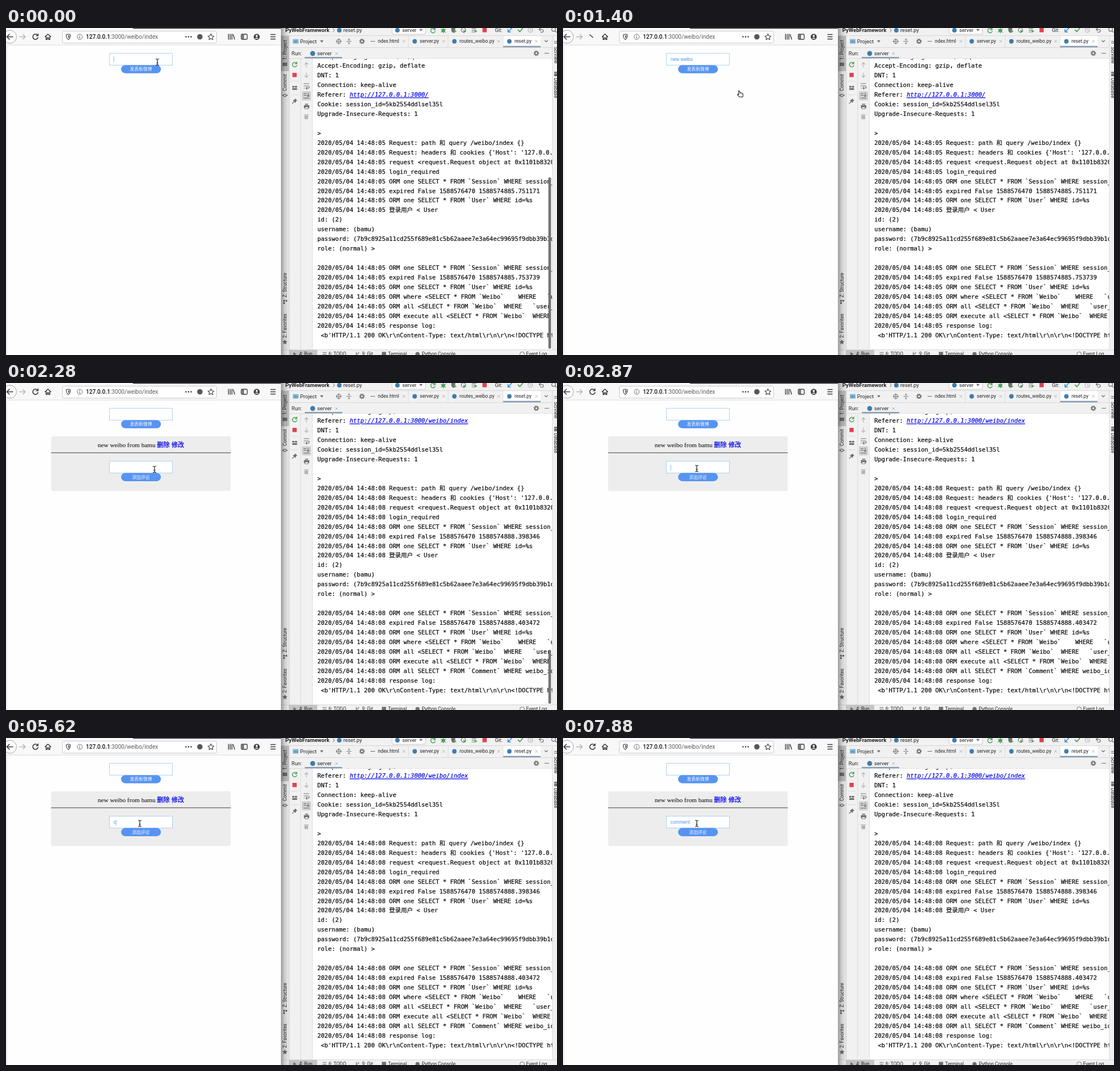
These frames come from a looping animation (972x576 px, 8000 ms). An HTML page:

```html
<!DOCTYPE html>
<html lang="en">
<head>
<meta charset="utf-8">
<title>Posting and commenting</title>
<style>
html, body { margin: 0; width: 100%; height: 100%; overflow: hidden; background: #fefefe; }
svg { display: block; width: 100vw; height: 100vh; }
text { white-space: pre; }
.ui { font-family: Roboto, 'Noto Sans CJK SC', 'Noto Sans CJK', sans-serif; }
.form { font-family: 'Liberation Sans', 'Noto Sans CJK SC', 'Noto Sans CJK', sans-serif; }
.serif { font-family: 'Liberation Serif', 'Noto Sans CJK SC', 'Noto Sans CJK', serif; }
.mono { font-family: 'DejaVu Sans Mono', 'Noto Sans CJK SC', 'Noto Sans CJK', monospace; stroke: #080808; stroke-width: .2; }
.url { fill: #0000e6; stroke: #0000e6; font-style: italic; text-decoration: underline; }
</style>
</head>
<body>
<svg id="stage" viewBox="0 0 972 576" xmlns="http://www.w3.org/2000/svg"></svg>
<script>
const LOOP = 8000;
const DARK = '#3c3c3f', GREY = '#6e6e6e', PALE = '#b4b4b6', GREEN = '#4fa35b', RED = '#e0424f';
const BLUE = '#5794f1', LINK = '#0000ee', PY = '#3f7cad', BAR = '#f1f1f1', EDGE = '#d2d2d2';

const esc = s => s.replace(/&/g, '&amp;').replace(/</g, '&lt;');
const rect = (x, y, w, h, fill, more = '') =>
  `<rect x="${x}" y="${y}" width="${w}" height="${h}" fill="${fill}" ${more}/>`;
const line = (d, color = DARK, w = 1.3, fill = 'none') =>
  `<path d="${d}" fill="${fill}" stroke="${color}" stroke-width="${w}" stroke-linecap="round" stroke-linejoin="round"/>`;
const shape = (d, fill) => `<path d="${d}" fill="${fill}"/>`;
const disc = (x, y, r, fill, more = '') => `<circle cx="${x}" cy="${y}" r="${r}" fill="${fill}" ${more}/>`;
const ring = (x, y, r, color = DARK, w = 1.2) => disc(x, y, r, 'none', `stroke="${color}" stroke-width="${w}"`);
const text = (x, y, s, size, fill = '#262626', cls = 'ui', more = '') =>
  `<text class="${cls}" x="${x}" y="${y}" font-size="${size}" fill="${fill}" ${more}>${esc(s)}</text>`;
const side = (x, y, s, turn) =>
  `<g transform="translate(${x} ${y}) rotate(${turn})">${text(0, 0, s, 8.4)}</g>`;
const group = (id, body = '', more = '') => `<g id="${id}" ${more}>${body}</g>`;
const cross = (x, y) => line(`M${x - 2} ${y - 2}l4 4m0-4l-4 4`, '#a3a3a3', .8);
const down = (x, y) => shape(`M${x - 3} ${y - 1.8}h6l-3 4z`, GREY);
const gear = (x, y) => ring(x, y, 2.6, GREY, 1.8) +
  disc(x, y, 4, 'none', `stroke="${GREY}" stroke-width="1.6" stroke-dasharray="1.6 1.54"`);

function browser() {
  let s = rect(0, 0, 485, 576, '#fefefe') + rect(0, 0, 485, 30, '#f8f8f9') + rect(0, 29.5, 485, 1, '#dcdcde') +
    rect(0, 30, 2.5, 546, '#f0f0f0') + rect(224, 0, 261, 1.2, '#2b2b2e');
  s += disc(7, 15.5, 11.5, '#fcfcfc', 'stroke="#a5a5a8"') + line('M12 15.5H1.5M6 11l-4.5 4.5L6 20', DARK, 1.6);
  s += line('M24 15.5h10M30 11.5l4 4-4 4', PALE, 1.4);
  s += line('M69 15.5l5-4.8 5 4.8M70.7 15v5.3h2.1v-3h2.4v3h2.1V15', DARK, 1.5);
  s += rect(99.5, 5.5, 272, 21, '#fff', 'rx="2.5" stroke="#cacacd"');
  s += line('M106.2 12l3.8-1.3 3.8 1.3c0 4-1 6.6-3.8 8.6-2.8-2-3.8-4.6-3.8-8.6z', DARK, 1.1) +
    shape('M110 12.5v6c1.5-1.5 2-3 2-5.3z', DARK);
  s += ring(130, 15.5, 4.5, GREY, 1) + rect(129.4, 14.8, 1.2, 3.4, GREY) + rect(129.4, 12.7, 1.2, 1.2, GREY);
  s += `<text class="ui" x="141" y="19.3" font-size="10.1" fill="#5c5c5f"><tspan fill="#111" font-weight="500">127.0.0.1</tspan>:3000/weibo/index</text>`;
  s += [317.5, 322, 326.5].map(x => disc(x, 15.5, 1.3, DARK)).join('');
  s += disc(342, 15.5, 4.8, '#58585b');
  s += line('M361.5 10.3l1.6 3.5 3.8.4-2.8 2.6.8 3.7-3.4-1.9-3.4 1.9.8-3.7-2.8-2.6 3.8-.4z', DARK, 1.1);
  s += line('M392.5 11v9M395.5 11v9M398.5 11v9M400.7 11.5l2.6 8.2', DARK, 1.4);
  s += rect(415, 11, 10.5, 9, 'none', `rx="1.5" stroke="${DARK}" stroke-width="1.3"`) + rect(416, 12, 4, 7, '#77777a');
  s += disc(442.3, 15.5, 5.3, DARK) + disc(442.3, 14, 1.9, '#f8f8f9') + shape('M438.8 18.8a3.6 2.5 0 0 1 7 0z', '#f8f8f9');
  return s + line('M467 11.5h8M467 15.5h8M467 19.5h8', DARK, 1.4);
}

const field = (y, label) =>
  rect(182.6, y, 111, 20.8, '#fff', 'stroke="#a7cbf5" stroke-width=".9"') +
  rect(203, y + 20.8, 70.3, 14.3, BLUE, 'rx="7.1"') +
  text(238, y + 30.8, label, 7.8, '#f4f8ff', 'form', 'text-anchor="middle"');

const link = (x, s, more = '') =>
  text(x, 113, s, 11.2, LINK, 'serif', `stroke="${LINK}" stroke-width=".25" ${more}`);

const card = () =>
  rect(79.5, 93.8, 317, 96.5, '#ededed', 'rx="4"') + rect(79.5, 122, 317, 1.7, '#858585') +
  text(161.8, 113, 'new weibo from bamu', 11.3, '#000', 'serif') +
  link(266.3, '删除') + link(291.9, '修改', 'id="edit"') + field(137.8, '添加评论');

function toolbars() {
  let s = rect(485, 0, 487, 576, BAR);
  s += rect(485, 13, 487, .8, EDGE) + rect(499, 34, 464, .8, EDGE) + rect(499, 53.5, 464, .8, EDGE);
  s += rect(485, 14, 14, 62, '#c4c4c4');
  s += rect(540, 54, 424, 512.5, '#fff');
  s += rect(499, 13, .7, 553, EDGE) + rect(519.5, 54, .7, 512, EDGE) + rect(540, 54, .7, 512, EDGE) + rect(963.5, 13, .8, 553, EDGE);

  // Breadcrumb and run bar
  s += text(492.8, 6.5, 'PyWebFramework', 9.55, '#222', 'ui', 'font-weight="700"') + line('M577 1l2.5 3-2.5 3', GREY, 1);
  s += disc(588, 4, 4, PY) + text(595, 6.5, 'reset.py', 9.3);
  s += rect(681, -6, 59, 17, '#fff', 'rx="3" stroke="#c9c9c9"') + disc(690.5, 4, 4, PY) +
    text(699, 6.8, 'server', 9.2) + down(732, 3.5);
  s += line('M756.5 2a4 4 0 1 0 .5 4M757 0v3h-3', GREEN, 1.5);
  s += disc(771.5, 4.5, 3.3, GREEN) + line('M767 2l9 6M767 7.5l9-6M771.5 0v9', GREEN, .9);
  s += shape('M785.5 0h7v3q0 4-3.5 5.5-3.5-1.5-3.5-5.5z', GREY) + shape('M789.5 3l5.5 3-5.5 3z', GREEN);
  s += ring(807, 3.5, 3.8, GREY) + shape('M807 3l5 3-5 3z', GREEN);
  s += line('M822 1h7M822 4h4M822 7h3', GREY, 1.2) + shape('M826.5 2.5l5 3-5 3z', GREEN);
  s += rect(840.5, 0, 7.5, 7.5, RED);
  s += text(862.5, 6.5, 'Git:', 8.6) + line('M892.5 0l-7 7M885.5 2.5V7h4.5', '#3990d0', 1.6) +
    line('M903.5 3.5l3 3 5-6', GREEN, 1.8);
  s += ring(925, 3.5, 4, PALE) + line('M925 1v3h2', PALE, 1) +
    line('M943 0l-2.5 2.5L943 5M941 2.5h4q3 0 3 2.5t-3 2.5h-2', GREY, 1.2);
  s += ring(966, 2.5, 3.3, GREY) + line('M968.5 5l2.5 2.5', GREY, 1.3);

  // Editor tabs
  s += rect(506, 19.5, 10, 8, '#8fb9d3') + rect(507.5, 22, 7, 4, '#5da5cb') + text(518.8, 26.7, 'Project', 9.3) + down(557, 23.5);
  s += ring(587, 23.5, 3.8, GREY, 1) + line('M587 18.5v10M582 23.5h10', GREY, .9);
  s += line('M601 23.5h8M605 18.5v3M603.5 20l1.5 1.5 1.5-1.5M605 28.5v-3M603.5 27l1.5-1.5 1.5 1.5', GREY, .9);
  s += gear(628, 23.5) + line('M643.5 23.5h7', GREY, 1.1);
  s += rect(877, 14, 66, 20, '#fff') + rect(877, 31.5, 66, 2.5, '#8a9cb3');
  const tabs = [[656, 'ndex.html', 702], [730, 'server.py', 772], [800, 'routes_weibo.py', 869], [897, 'reset.py', 935.5]];
  tabs.forEach(([x, name, close], i) => {
    if (i) s += disc(x - 9, 23.5, 3.9, PY);
    s += text(x, 26.4, name, 8.5) + cross(close, 23.5);
    if (i < 3) s += rect(close + 7.5, 14, .7, 20, EDGE);
  });
  s += line('M950.5 22l2.5 2.5 2.5-2.5', GREY, 1.1);

  // Run panel header
  s += text(503.8, 48, 'Run:', 9.2) + disc(541, 44.8, 4.4, PY) + text(549, 48, 'server', 9.4) + cross(583, 45);
  s += rect(527, 51, 66, 2.5, '#8a9cb3') + gear(935.5, 44.5) + line('M950.5 44.5h7', GREY, 1.1);

  // Run panel gutters
  s += line('M512.5 62a4 4 0 1 0 .5 4M513 60v3h-3', GREEN, 1.5) + rect(505.3, 79, 7.5, 7.5, RED) + rect(503, 93.5, 13, .7, EDGE);
  s += rect(505, 102, 3.5, 3, GREY) + rect(509.5, 102, 4, 3, GREY) + rect(505, 106, 8.5, 3, GREY);
  s += rect(503, 117, 13, .7, EDGE) + line('M505 133l3-3', GREY, 1.1) + shape('M510 124l4 4-2 .6-1.5 3.4-4.5-4.5 3.4-1.5z', GREY);
  s += line('M530 69v-8M527 64l3-3 3 3M530 79v8M527 84l3 3 3-3', PALE, 1.2);
  s += line('M525.5 98h9M525.5 102h7q2.5 0 2.5 2t-2.5 2h-3M531 104l-2 2 2 2M525.5 106h1', GREY, 1.1);
  s += rect(522, 111.5, 16, 16, '#cfcfcf', 'rx="2"') +
    line('M525.5 115.5h4M525.5 118.5h4M525.5 123.5h9M533 114.5v6M531 118.8l2 2 2-2', GREY, 1.1);
  s += rect(525.5, 136, 9.5, 5, GREY) + rect(527.5, 133.5, 5.5, 1.7, GREY) +
    rect(527.5, 139, 5.5, 3.5, BAR, `stroke="${GREY}" stroke-width=".8"`);
  s += rect(526.5, 154, 6.5, 6.5, PALE) + rect(525.5, 152, 8.5, 1.2, PALE);

  // Side strips
  s += side(495, 56, '1: Project', -90) + rect(488, 61, 8, 6, GREY);
  s += side(495, 111, 'Commit', -90) + ring(492, 118.5, 2.3, GREY, 1.1) + line('M487.5 118.5h2M494.5 118.5h2', GREY);
  s += side(495, 474.5, 'Z: Structure', -90) + rect(489, 479, 3, 3, GREY) + rect(493, 479, 3, 3, GREY) + rect(489, 483, 3, 3, GREY);
  s += side(495, 546, '2: Favorites', -90) +
    shape('M492 548.5l1.3 3 3.2.3-2.4 2.2.7 3.2-2.8-1.7-2.8 1.7.7-3.2-2.4-2.2 3.2-.3z', GREY);
  s += rect(967, 23, 5, 1.2, GREY) + rect(967, 26, 5, 1.2, GREY) + side(967, 33, 'SciView', 90);
  s += rect(967, 77, 5, 8, GREY) + rect(967, 79.5, 5, .8, BAR) + side(967, 88, 'Database', 90);

  // Status strip
  s += rect(485, 566.5, 487, .8, EDGE) + rect(499, 567, 50, 9, '#c4c4c4') + shape('M507 571l5.5 3.2-5.5 3.2z', GREY);
  const items = [[517, '4: Run'], [569, '6: TODO'], [628, '9: Git'], [674, 'Terminal'], [733.5, 'Python Console'], [917.5, 'Event Log']];
  for (const [x, name] of items) s += text(x, 577, name, 8.5);
  s += line('M559 571.5h6M559 574.5h6', GREY, 1.2) + line('M618 571v6M622 571v2l-4 2', GREY, 1.2);
  s += rect(663, 570.5, 7.5, 7, GREY) + disc(726, 574.5, 3.7, GREY) + ring(910.5, 574.5, 4, GREY, 1);

  // Shadow of the browser window
  return s + rect(485, 0, 17, 576, 'url(#shade)');
}

// One request as printed by the server
function log(sec, head, expiry, extra) {
  const stamp = s => `2020/05/04 14:48:${sec} ${s}`;
  const session = i => [
    'ORM one SELECT * FROM `Session` WHERE session_id=%s',
    `expired False 1588576470 15885748${expiry[i]}`,
    'ORM one SELECT * FROM `User` WHERE id=%s'
  ].map(stamp);
  return [
    ...head, 'Cookie: session_id=5kb2554ddlsel35l', 'Upgrade-Insecure-Requests: 1', '', '>',
    ...['Request: path 和 query /weibo/index {}', "Request: headers 和 cookies {'Host': '127.0.0.1:3000'",
      'request <request.Request object at 0x1101b8320>', 'login_required'].map(stamp),
    ...session(0), stamp('登录用户 < User'), 'id: (2)', 'username: (bamu)',
    'password: (7b9c8925a11cd255f689e81c5b62aaee7e3a64ec99695f9dbb39b1d', 'role: (normal) >', '',
    ...session(1),
    ...['ORM where <SELECT * FROM `Weibo`    WHERE   `user_id`', 'ORM all <SELECT * FROM `Weibo`  WHERE   `user_id`',
      'ORM execute all <SELECT * FROM `Weibo`  WHERE   `user', ...extra, 'response log:'].map(stamp),
    " <b'HTTP/1.1 200 OK\\r\\nContent-Type: text/html\\r\\n\\r\\n<!DOCTYPE html>"
  ];
}

function printLog(lines) {
  return lines.map((s, i) => {
    const y = (544.5 - (lines.length - 1 - i) * 16.93).toFixed(2);
    const body = esc(s).replace(/http:\S+/, '<tspan class="url">$&</tspan>');
    return `<text class="mono" x="549.2" y="${y}" font-size="10.52" fill="#080808">${body}</text>`;
  }).join('');
}

const before = log('05', ['Accept-Language: zh-CN,zh;q=0.8', 'Accept-Encoding: gzip, deflate', 'DNT: 1', 'Connection: keep-alive',
  'Referer: http://127.0.0.1:3000/'], ['85.751171', '85.753739'], []);
const after = log('08', ['Accept-Encoding: gzip, deflate', 'Referer: http://127.0.0.1:3000/weibo/index', 'DNT: 1',
  'Connection: keep-alive'], ['88.398346', '88.403472'], ['ORM all SELECT * FROM `Comment` WHERE weibo_id=%s']);

const pointers = {
  beam: line('M-2.5-5.5q2 0 2.5 1.2.5-1.2 2.5-1.2M0-4.5v9M-2.5 5.5q2 0 2.5-1.2.5 1.2 2.5 1.2M-1.2 1.5h2.4', '#111', 1.1),
  hand: line('M-2.5-5q1.2-1 2 .3l1 3.2q1-.8 1.7.2 1-.6 1.7.3 1.3-.3 1.5 1.2.4 2.3-.5 5.3H-.8Q-2 4-3.8 2.2-4.6.5-3.2.2l1.5 1z', '#222', 1.1, '#fff'),
  arrow: line('M0 0v10l2.3-2.2 1.7 3.7 1.5-.7-1.7-3.6h3.2z', '#fff', .8, '#111')
};

const stop = (offset, alpha) => `<stop offset="${offset}" stop-color="#000" stop-opacity="${alpha}"/>`;

document.getElementById('stage').innerHTML =
  `<defs><clipPath id="pane"><rect x="540" y="54.3" width="423.5" height="512"/></clipPath>
   <linearGradient id="shade">${stop(0, .36) + stop(.4, .14) + stop(1, 0)}</linearGradient></defs>` +
  browser() + group('reload') + rect(66, 0, 112, 1.6, '#3a95f5', 'id="progress"') +
  field(44.6, '发表新微博') + group('card', card()) +
  text(189.8, 58, '', 8.25, '#4c93ea', 'form', 'id="post"') + text(189.8, 151.3, '', 8.25, '#4c93ea', 'form', 'id="comment"') +
  rect(0, 0, 1, 10, '#86b4f2', 'id="caret"') + toolbars() +
  group('console', group('logA', printLog(before)) + group('logB', printLog(after)), 'clip-path="url(#pane)"') +
  rect(956.8, 0, 4.7, 0, '#747474', 'id="thumb" rx="2.3"') + group('pointer');

const el = id => document.getElementById(id);
const show = (id, on) => el(id).setAttribute('visibility', on ? 'visible' : 'hidden');
const at = (track, t) => track.reduce((now, step) => t >= step[0] ? step : now)[1];

const postTrack = [[0, ''], [290, 'new'], [410, 'new we'], [530, 'new weibo'], [1610, '']];
const commentTrack = [[0, ''], [5620, 'c'], [5740, 'co'], [5970, 'com'], [6090, 'comm'],
  [7050, 'comme'], [7170, 'commen'], [7520, 'comment']];
const caretTrack = [[0, 1], [1250, 0], [2870, 1], [3350, 0], [3950, 1], [4540, 0], [5140, 1],
  [6210, 0], [6810, 1], [7400, 0], [7520, 1], [7880, 0]];
const thumbTrack = [[0, 1], [150, 0], [1610, 1], [2540, .45], [2690, 0]];
const pointerTrack = [[0, ['beam', 267, 60]], [530, ['beam', 267, 66]], [650, ['hand', 266, 78]],
  [1250, ['hand', 298, 109]], [1400, ['hand', 312, 116]], [1900, ['arrow', 308, 122]], [2010, ['arrow', 303, 130]],
  [2160, ['arrow', 288, 142]], [2280, ['beam', 262, 152]], [2400, ['beam', 244, 152]], [2540, ['beam', 236, 150.5]]];
const arc = 'M55.5 12.3a4.7 4.7 0 1 0 1 4.5';
const reload = color => line(arc, color, 1.6) + line('M57 10v4h-4z', color, .6, color);
const reloadTrack = [[0, reload(DARK)], [1250, line(arc, DARK, 1.6)], [1400, line('M47.5 12l5 4.5', DARK, 1.6)],
  [1610, reload(PALE)], [2160, reload(DARK)]];

const drawn = {};
function swap(id, html) {
  if (drawn[id] !== html) el(id).innerHTML = drawn[id] = html;
}

function render(t) {
  const posted = t >= 1610;
  show('card', posted);
  show('logA', !posted);
  show('logB', posted);
  show('progress', posted && t < 1750);
  for (const paint of ['fill', 'stroke']) el('edit').setAttribute(paint, t < 2160 ? '#5a9bf5' : LINK);
  swap('reload', at(reloadTrack, t));

  el('post').textContent = at(postTrack, t);
  el('comment').textContent = at(commentTrack, t);
  const input = el(posted ? 'comment' : 'post');
  const width = input.textContent ? input.getComputedTextLength() : 0;
  el('caret').setAttribute('x', 189.6 + width);
  el('caret').setAttribute('y', posted ? 144 : 50);
  show('caret', at(caretTrack, t));

  const top = posted ? 470 : 263;
  el('thumb').setAttribute('y', top);
  el('thumb').setAttribute('height', 565 - top);
  el('thumb').setAttribute('opacity', at(thumbTrack, t));

  const [kind, x, y] = at(pointerTrack, t);
  swap('pointer', pointers[kind]);
  el('pointer').setAttribute('transform', `translate(${x} ${y})`);
}

const start = performance.now();
function tick() {
  render((performance.now() - start) % LOOP);
  requestAnimationFrame(tick);
}
render(0);
requestAnimationFrame(tick);
</script>
</body>
</html>
```
